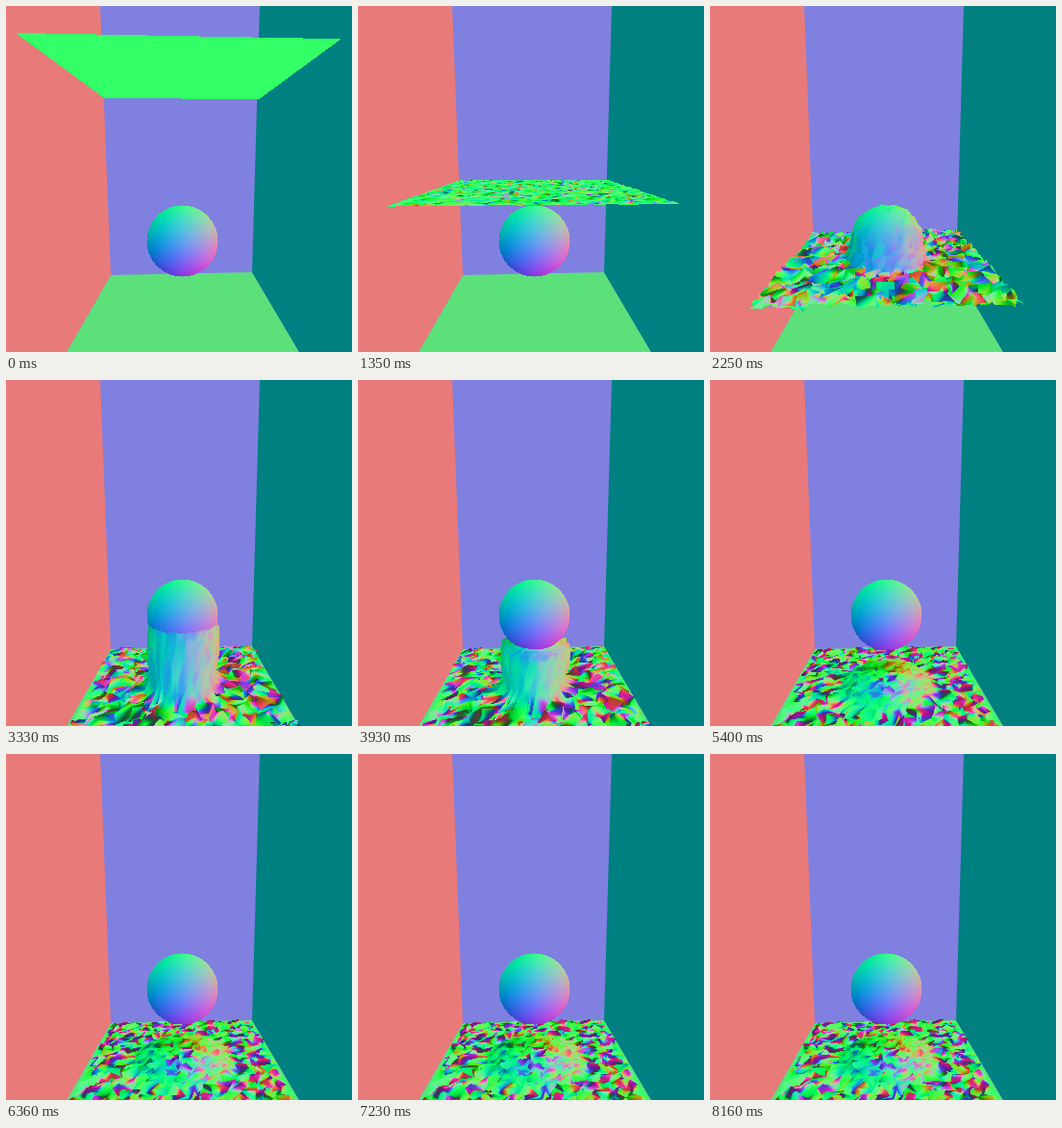
An HTML page with a canvas that plays this animation: 360 by 360 pixels, repeating every 8.19 s.

```html
<!DOCTYPE html>
<html lang="en">
<head>
<meta charset="utf-8">
<title>Cloth over a sphere</title>
<style>
html, body { margin: 0; height: 100%; overflow: hidden; background: #8080e0 }
canvas { display: block }
</style>
</head>
<body>
<canvas id="stage" width="360" height="360"></canvas>
<script>
const SIZE = 360, LOOP = 8190, STEP = 30;
const N = 38, ROW = N + 1;
const CX = 183, HORIZON = 155, FOCAL = 300;
const BALL = { x: 183, y: 244, px: 37, r: 0.369, h: 0.888, d: 2.99 };
const ctx = document.getElementById('stage').getContext('2d', { willReadFrequently: true });

const clamp = (x, lo = 0, hi = 1) => Math.min(hi, Math.max(lo, x));
const mix = (a, b, k) => a + (b - a) * k;
const ramp = (t, start, length) => clamp((t - start) / length);
const easeOut = (p, power) => 1 - (1 - p) ** power;

let seed = 7;
function random() {
  seed = (seed + 0x6D2B79F5) | 0;
  let v = Math.imul(seed ^ (seed >>> 15), 1 | seed);
  v = (v + Math.imul(v ^ (v >>> 7), 61 | v)) ^ v;
  return ((v ^ (v >>> 14)) >>> 0) / 4294967296;
}
// Each cloth vertex has six slow waves: three bend its normal, three move it.
const waves = Array.from({ length: ROW * ROW }, () =>
  Array.from({ length: 6 }, () => ({ phase: random() * 2 * Math.PI, speed: 0.5 + random() })));

function poly(color, ...pts) {
  ctx.fillStyle = color;
  ctx.beginPath();
  for (let i = 0; i < pts.length; i += 2) ctx.lineTo(pts[i], pts[i + 1]);
  ctx.fill();
}
poly('#8080e0', 0, 0, SIZE, 0, SIZE, SIZE, 0, SIZE);
poly('#5ce07a', 109, 280, 256, 277, 305, 360, 63, 360);
poly('#e97a7a', 0, 0, 98, 0, 109, 280, 63, 360, 0, 360);
poly('#008080', 360, 0, 264, 0, 256, 277, 305, 360, 360, 360);
const room = ctx.getImageData(0, 0, SIZE, SIZE);
const image = ctx.createImageData(SIZE, SIZE);
const near = new Float32Array(SIZE * SIZE);

// Colours a pixel by its surface normal if it is the nearest so far; w is 1 / depth.
function plot(x, y, w, nx, ny, nz) {
  const p = y * SIZE + x;
  if (w <= near[p]) return;
  near[p] = w;
  const len = Math.hypot(nx, ny, nz) || 1;
  nx /= len; ny /= len; nz /= len;
  image.data[p * 4] = 255 * (0.4 - 0.2 * ny + 0.55 * nx);
  image.data[p * 4 + 1] = 255 * (0.54 + 0.46 * ny);
  image.data[p * 4 + 2] = 255 * (0.47 - 0.07 * ny + 0.48 * nz);
}

function triangle(a, b, c) {
  const area = (b.x - a.x) * (c.y - a.y) - (c.x - a.x) * (b.y - a.y);
  if (Math.abs(area) < 1e-6) return;
  const x0 = Math.max(0, Math.ceil(Math.min(a.x, b.x, c.x)));
  const x1 = Math.min(SIZE - 1, Math.floor(Math.max(a.x, b.x, c.x)));
  const y0 = Math.max(0, Math.ceil(Math.min(a.y, b.y, c.y)));
  const y1 = Math.min(SIZE - 1, Math.floor(Math.max(a.y, b.y, c.y)));
  for (let y = y0; y <= y1; y++) for (let x = x0; x <= x1; x++) {
    const k = ((b.x - x) * (c.y - y) - (c.x - x) * (b.y - y)) / area;
    const l = ((c.x - x) * (a.y - y) - (a.x - x) * (c.y - y)) / area;
    const m = 1 - k - l;
    if (k < 0 || l < 0 || m < 0) continue;
    const at = i => k * a.n[i] + l * b.n[i] + m * c.n[i];
    plot(x, y, k * a.w + l * b.w + m * c.w, at(0), at(1), at(2));
  }
}

function drawBall() {
  const { x, y, px, r, d } = BALL, c = Math.cos(0.22), s = Math.sin(0.22);
  for (let j = -px; j <= px; j++) for (let i = -px; i <= px; i++) {
    const q = 1 - (i * i + j * j) / (px * px);
    if (q < 0) continue;
    const nx = 0.88 * i / px, ny = -0.88 * j / px;
    const nz = Math.sqrt(1 - nx * nx - ny * ny);
    plot(x + i, y + j, 1 / (d - r * Math.sqrt(q)), nx, ny * c + nz * s, nz * c - ny * s);
  }
}

// World h grows downwards from eye level, z towards the viewer.
function project(x, h, z, n) {
  const w = 1 / (2.86 - 0.98 * z + 0.15 * h + 0.045 * x);
  return { x: CX + FOCAL * x * w, y: HORIZON + FOCAL * h * w, w, n };
}

// Shape of the cloth around the ball: new radius, height and outward normal.
function drape(rho, cos, sin, plane, cap, calm) {
  const { r, h: mid } = BALL;
  if (rho >= 0.62) return { radius: mix(0.43, 1, (rho - 0.62) / 0.38), h: plane };
  if (rho < 0.4) {
    const radius = rho * 0.93;
    const dome = mid - Math.sqrt(Math.max(0, 0.374 ** 2 - radius ** 2));
    const h = Math.min(plane, Math.max(dome, cap));
    return { radius, h, n: [cos * radius / r, Math.max(0.3, (mid - h) / r), sin * radius / r] };
  }
  const k = (rho - 0.4) / 0.22;
  return {
    radius: 0.372 + mix(0.05, -0.1, calm) * k,
    h: mix(Math.min(plane, Math.max(mid, cap)), plane, k),
    n: [cos, mix(0.15, 0.6, calm), sin * mix(1, 0.3, calm)]
  };
}

function drawCloth(t) {
  const back = mix(96, 278.5, easeOut(ramp(t, 90, 3110), 1.2));
  const q = (back - HORIZON) / FOCAL, plane = 3.84 * q / (1 - 0.15 * q);
  const cap = mix(0.5, 1.62, easeOut(ramp(t, 2300, 3500), 1.6));
  const rough = ramp(t, 900, 1350), calm = ramp(t, 2600, 2000);
  const rest = ramp(back, 233, 45), lift = clamp((plane - cap) * 4);
  const bump = 0.045 * rough * rough * mix(1, 0.4, calm);
  const shift = 0.055 * rough;
  const flip = 0.84 * Math.min(1, 2 * rough);
  const tilt = 0.85 * rough * mix(1, 0.4, calm);
  const drift = 0.025 * Math.min(1, 2 * rough);
  const time = 8 * (1 - Math.exp(-t / 2500));

  const verts = waves.map((wave, id) => {
    const i = id % ROW, j = Math.floor(id / ROW);
    const noise = m => Math.sin(wave[m].phase + wave[m].speed * time);
    const border = i % N === 0 || j % N === 0;
    const free = border ? 0.5 * (1 - rest) : 1;
    let x = 2 * i / N - 1, z = 2 * j / N - 1, h = plane, loose = free;
    const n = [tilt * noise(0) * free, 1 - flip * free * (1 - noise(1)), tilt * noise(2) * free];

    const rho = Math.hypot(x, z) || 1e-6;
    if (lift && rho < 1) {
      const fold = drape(rho, x / rho, z / rho, plane, cap, calm);
      const scale = mix(1, fold.radius / rho, lift);
      x *= scale;
      z *= scale;
      h = fold.h;
      if (fold.n) {
        const k = 0.8 * Math.sqrt(lift);
        fold.n.forEach((v, m) => { n[m] = mix(n[m], v, k); });
        loose *= 1 - 0.6 * lift;
      }
    }

    h += bump * loose * (noise(3) - rest);
    x += shift * loose * noise(4);
    z += shift * loose * noise(5);
    if (rest) {
      x = clamp(x, -1, 1);
      z = clamp(z, -1, 1);
    }
    x += (drift * (1 - x) - 0.01 * rest * (1 + x)) * (1 + z) / 2;
    return project(x, h, z, n);
  });

  for (let j = 0; j < N; j++) for (let i = 0; i < N; i++) {
    const a = verts[j * ROW + i], b = verts[j * ROW + i + 1];
    const c = verts[(j + 1) * ROW + i], d = verts[(j + 1) * ROW + i + 1];
    triangle(a, b, c);
    triangle(b, d, c);
  }
}

function frame(now) {
  const t = Math.floor(now % LOOP / STEP) * STEP;
  image.data.set(room.data);
  near.fill(0);
  drawBall();
  drawCloth(t);
  ctx.putImageData(image, 0, 0);
  requestAnimationFrame(frame);
}
requestAnimationFrame(frame);
</script>
</body>
</html>
```
